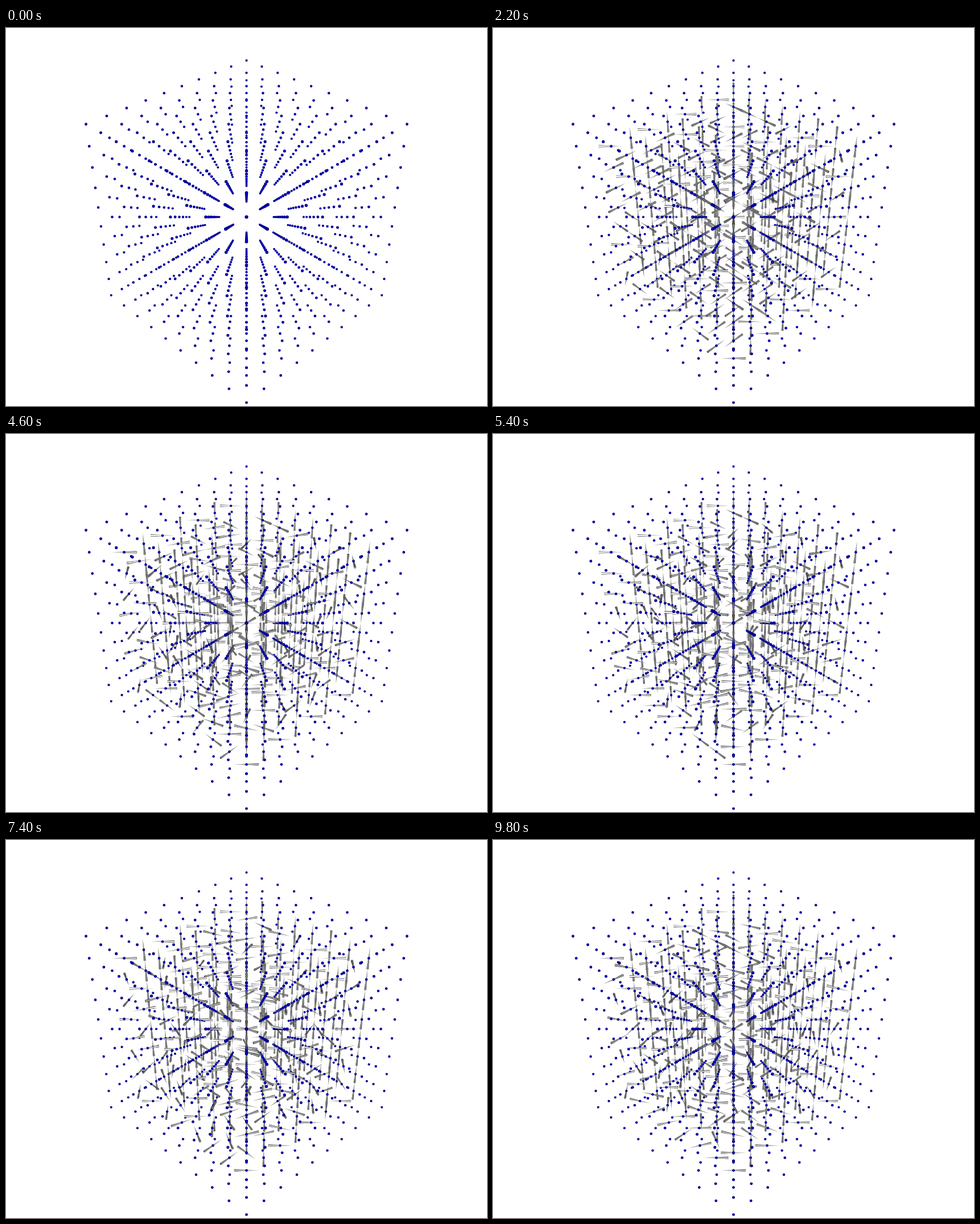
Write an HTML page with a canvas that moves like this. It is 845 px wide and 663 px high and loops after 10000 ms.

```html
<!DOCTYPE html>
<html lang="en">
<head>
<meta charset="utf-8">
<title>Lattice</title>
<style>
html, body { margin: 0; width: 100%; height: 100%; overflow: hidden; background: #fff; }
canvas { display: block; }
</style>
</head>
<body>
<canvas id="stage" width="845" height="663"></canvas>
<script>
const ctx = document.getElementById('stage').getContext('2d');
const N = 10, STEPS = 50, STEP_MS = 200;
const FOCAL = 331.5 / Math.tan(Math.PI / 12), DIST = 30.52;
const DOT = 0.055, CONE = 0.05, SIDES = 6;
const S2 = Math.SQRT2, S3 = Math.sqrt(3), S6 = Math.sqrt(6);
const EYE = [DIST / S3, DIST / S3, DIST / S3];
const SLAB_START = [1, 3, 3, 5, 5, 7, 7, 9];

let seed = 20417;
function rand() {
  seed = (seed + 0x6D2B79F5) | 0;
  let t = Math.imul(seed ^ (seed >>> 15), 1 | seed);
  t = (t + Math.imul(t ^ (t >>> 7), 61 | t)) ^ t;
  return ((t ^ (t >>> 14)) >>> 0) / 4294967296;
}
const pick = list => list[Math.floor(rand() * list.length)];

const add = (a, b, k = 1) => a.map((v, i) => v + b[i] * k);
const dot = (a, b) => a[0] * b[0] + a[1] * b[1] + a[2] * b[2];
const unit = a => a.map(v => v / Math.hypot(...a));
const cross = (a, b) => [
  a[1] * b[2] - a[2] * b[1],
  a[2] * b[0] - a[0] * b[2],
  a[0] * b[1] - a[1] * b[0]
];

// Perspective view straight down the cube's main diagonal
function project([x, y, z]) {
  const scale = FOCAL / (DIST - (x + y + z) / S3);
  return [422.5 + scale * (y - x) / S2, 331.5 - scale * (2 * z - x - y) / S6, scale];
}

// Even slabs hold vertical cones, odd slabs hold cones lying in the xy plane
function direction({ pos: [, y, z], slab, lean }, step) {
  const s = pick([-1, 1]);
  if (slab % 2 === 0) return [0, 0, rand() < 0.78 ? lean : -lean];
  let turns = 0.5 * Math.sign(y * z);
  if (Math.abs(y) < 3.5 || Math.abs(z) < 3.5) {
    if (step < 12) turns = pick([0, 0, 1, 1, -0.5]);
    else turns = pick([-0.5, -0.5, 0, 1, 0.5]) + pick([0, 0, -0.2, 0.2]);
  }
  const angle = turns * Math.PI / 2;
  return [s * Math.cos(angle), s * Math.sin(angle), 0];
}

function history(cell) {
  const start = SLAB_START[cell.slab], rate = cell.slab % 2 ? 0.22 : 0.12;
  const dirs = [];
  for (let s = 0; s < STEPS; s++) {
    if (s < start) dirs.push(null);
    else if (s === start || (s > 5 && rand() < rate)) dirs.push(direction(cell, s));
    else dirs.push(dirs[s - 1]);
  }
  return dirs;
}

const cells = [];
for (let i = 0; i < N; i++)
  for (let j = 0; j < N; j++) {
    const lean = rand() < 0.6 ? 1 : -1;
    for (let k = 0; k < N; k++) {
      const cell = { pos: [i - 4.5, j - 4.5, k - 4.5], slab: i - 1, depth: i + j + k, lean };
      const inner = [i, j, k].every(n => n > 0 && n < N - 1);
      cell.dirs = inner ? history(cell) : [];
      cells.push(cell);
    }
  }
cells.sort((a, b) => a.depth - b.depth);

function polygon(points, facing) {
  const level = Math.round(255 * Math.min(1, 0.58 * facing + 0.45 * facing ** 24));
  ctx.fillStyle = `rgb(${level},${level},${level})`;
  ctx.beginPath();
  for (const p of points) {
    const [x, y] = project(p);
    ctx.lineTo(x, y);
  }
  ctx.fill();
}

function drawCone(pos, dir) {
  const view = unit(add(EYE, pos, -1));
  const base = add(pos, dir, -0.5), tip = add(pos, dir, 0.5);
  const u = unit(cross(dir, dir[2] ? [1, -1, 0] : [0, 0, 1]));
  const w = cross(dir, u);
  const radial = a => add(u.map(v => v * Math.cos(a)), w, Math.sin(a));
  const rim = [];
  for (let n = 0; n < SIDES; n++) rim.push(add(base, radial(n * 2 * Math.PI / SIDES), CONE));
  for (let n = 0; n < SIDES; n++) {
    const normal = unit(add(radial((n + 0.5) * 2 * Math.PI / SIDES), dir, CONE));
    const facing = dot(normal, view);
    if (facing > 0) polygon([rim[n], rim[(n + 1) % SIDES], tip], facing);
  }
  const capFacing = -dot(dir, view);
  if (capFacing > 0) polygon(rim, capFacing);
}

function disc(x, y, r, color) {
  ctx.fillStyle = color;
  ctx.beginPath();
  ctx.arc(x, y, r, 0, 2 * Math.PI);
  ctx.fill();
}

function draw(step) {
  ctx.fillStyle = '#fff';
  ctx.fillRect(0, 0, 845, 663);
  for (const { pos, dirs } of cells) {
    if (dirs[step]) drawCone(pos, dirs[step]);
    const [x, y, scale] = project(pos);
    disc(x, y, DOT * scale, '#000070');
    disc(x, y, DOT * scale * 0.7, '#0000c4');
  }
}

let shown = -1;
const begin = performance.now();
function tick() {
  const step = Math.floor((performance.now() - begin) / STEP_MS) % STEPS;
  if (step !== shown) draw(shown = step);
  requestAnimationFrame(tick);
}
tick();
</script>
</body>
</html>
```
